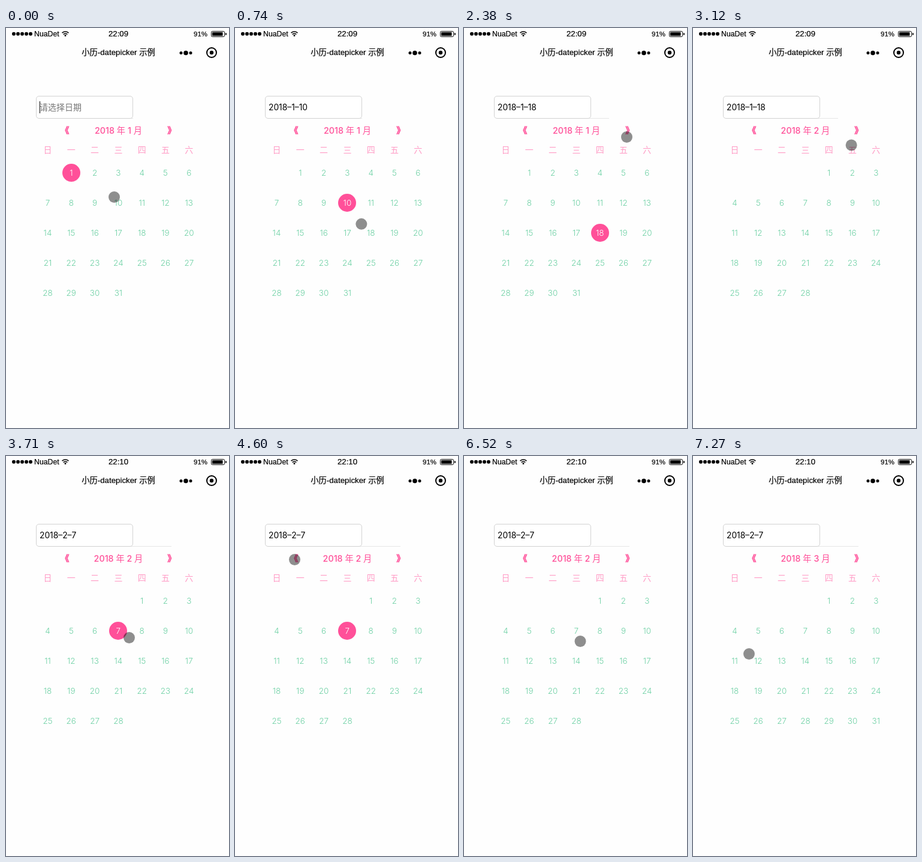
These frames come from a looping animation (372x666 px, 8000 ms). An HTML page:

```html
<!DOCTYPE html>
<html lang="zh">
<head>
<meta charset="utf-8">
<style>
html, body { margin: 0; width: 100%; height: 100%; overflow: hidden; background: #fefefe; }
svg { display: block; width: 372px; height: 666px; }
text { font: 14px Inter, "Noto Sans CJK SC", "Noto Sans CJK", sans-serif; text-anchor: middle; }
.bar text { font-family: "Liberation Sans", "Noto Sans CJK SC", "Noto Sans CJK", sans-serif; stroke: #000; stroke-width: .2; }
text.left { text-anchor: start; }
.head text { font-size: 14.3px; font-weight: 500; fill: #ff5099; }
.head .arrow { font-weight: 700; stroke: #ff5099; stroke-width: .5; }
.week { fill: #ff9dc6; }
#days text { font-size: 13.5px; font-weight: 300; fill: #6dd0a4; }
#days .on { fill: #fff; }
#value { font-size: 13.8px; }
#value.empty { font-size: 14px; fill: #777; }
</style>
</head>
<body>
<svg viewBox="0 0 372 666">
  <g class="bar">
    <g id="signal"></g>
    <text class="left" x="47" y="13.5" style="font-size:12.3px">NuaDet</text>
    <g fill="none" stroke="#000" stroke-width="1.6">
      <path d="M93.5 8.2Q99 3.8 104.5 8.2M95.7 10.6Q99 8 102.3 10.6"/>
      <circle cx="99" cy="12.6" r=".7"/>
    </g>
    <text id="clock" x="187.5" y="13.5" style="font-size:13.2px"></text>
    <text class="left" x="313" y="13.5" style="font-size:11.5px">91%</text>
    <rect x="342.5" y="5.5" width="22" height="9" rx="2" fill="none" stroke="#000"/>
    <rect x="344" y="7" width="17.5" height="6" rx=".5"/>
    <path d="M366 8q2 0 2 2t-2 2z"/>
    <text x="187.5" y="45" style="font-size:13.3px">小历-datepicker 示例</text>
    <circle cx="292" cy="41.5" r="2.5"/>
    <circle cx="300" cy="41.5" r="3.8"/>
    <circle cx="308" cy="41.5" r="2.5"/>
    <circle cx="343" cy="41" r="8" fill="none" stroke="#000" stroke-width="2"/>
    <circle cx="343" cy="41" r="3.2"/>
  </g>

  <path id="rule" stroke="#e6e6e6"/>
  <rect x="50.5" y="113.5" width="161" height="37" rx="4.5" fill="#fff" stroke="#d2d2d2"/>
  <text id="value" class="left" x="56" y="137"></text>
  <rect id="caret" x="56" y="122" width="1" height="20"/>

  <g class="head">
    <text class="arrow" x="98.5" y="176">《</text>
    <text id="month" x="187.5" y="176"></text>
    <text class="arrow" x="276.5" y="176">》</text>
  </g>
  <g id="week"></g>
  <g id="days"></g>
  <circle id="touch" r="9.5" fill-opacity=".44"/>
</svg>

<script>
const LOOP = 8000, TICK = 148.2;   // the screen refreshes once per tick
const $ = id => document.getElementById(id);
const colX = c => 69.5 + 39.3 * c;

// Finger strokes: first tick, last tick, end point, acceleration power
const home = { x: 180.5, y: 281.5 };
const strokes = [
  { from: 4, to: 7, x: 226.5, y: 349.5, power: .6 },
  { from: 12, to: 16, x: 271.5, y: 181.5, power: 1.5 },
  { from: 21, to: 23, x: 205.5, y: 302.5, power: 2 },
  { from: 27, to: 31, x: 99.5, y: 172.5, power: 1 },
  { from: 35, to: 37, x: 244.5, y: 308.5, power: 1 },
  { from: 39, to: 41, x: 100.5, y: 308.5, power: 2 },
  { from: 44, to: 45, x: 287.5, y: 308.5, power: 1 },
  { from: 48, to: 49, x: 93.5, y: 329.5, power: 1 }
];

// What the finger does to the calendar; no day means only the month turns
const actions = [
  { tick: 0, month: 1, day: 1 },
  { tick: 1, month: 1, day: 10 },
  { tick: 9, month: 1, day: 18 },
  { tick: 18, month: 2 },
  { tick: 25, month: 2, day: 7 },
  { tick: 33, month: 1 },
  { tick: 41, month: 2 },
  { tick: 49, month: 3 }
];

function touchAt(tick) {
  let { x, y } = home;
  for (const s of strokes) {
    if (tick < s.from) break;
    const p = Math.min(1, (tick - s.from + 1) / (s.to - s.from + 1)) ** s.power;
    x += (s.x - x) * p;
    y += (s.y - y) * p;
  }
  return { x, y };
}

function daysOf(month, picked) {
  const first = new Date(2018, month - 1, 1).getDay();
  const count = new Date(2018, month, 0).getDate();
  let out = "";
  for (let d = 1; d <= count; d++) {
    const cell = first + d - 1, on = d === picked;
    const x = colX(cell % 7), y = 241 + 50 * Math.floor(cell / 7);
    if (on) out += `<circle cx="${Math.round(x)}" cy="${y}" r="15" fill="#ff5099"/>`;
    out += `<text class="${on ? "on" : ""}" x="${x}" y="${y + 5}">${d}</text>`;
  }
  return out;
}

function draw(tick) {
  const { x, y } = touchAt(tick);
  $("touch").setAttribute("cx", x);
  $("touch").setAttribute("cy", y);
  $("clock").textContent = tick < 22 ? "22:09" : "22:10";
  $("rule").setAttribute("d", `M208 150.5H${tick < 9 ? 212 : tick < 22 ? 242 : 276}`);

  const done = actions.filter(a => a.tick <= tick);
  const now = done.at(-1);
  const chosen = done.findLast(a => a.day && a.tick);
  $("value").textContent = chosen ? `2018–${chosen.month}–${chosen.day}` : "请选择日期";
  $("value").classList.toggle("empty", !chosen);
  $("caret").setAttribute("opacity", chosen ? 0 : 1);
  $("month").textContent = `2018 年 ${now.month} 月`;
  $("days").innerHTML = daysOf(now.month, now.day);
}

$("signal").innerHTML = [0, 1, 2, 3, 4]
  .map(i => `<circle cx="${13 + 7 * i}" cy="9.8" r="3"/>`).join("");
$("week").innerHTML = [..."日一二三四五六"]
  .map((s, c) => `<text class="week" x="${colX(c)}" y="208">${s}</text>`).join("");

const start = performance.now();
let shown = -1;
function loop() {
  const t = (performance.now() - start) % LOOP;
  const tick = Math.floor((t + 4) / TICK);
  if (tick !== shown) draw(shown = tick);
  requestAnimationFrame(loop);
}
loop();
</script>
</body>
</html>
```
